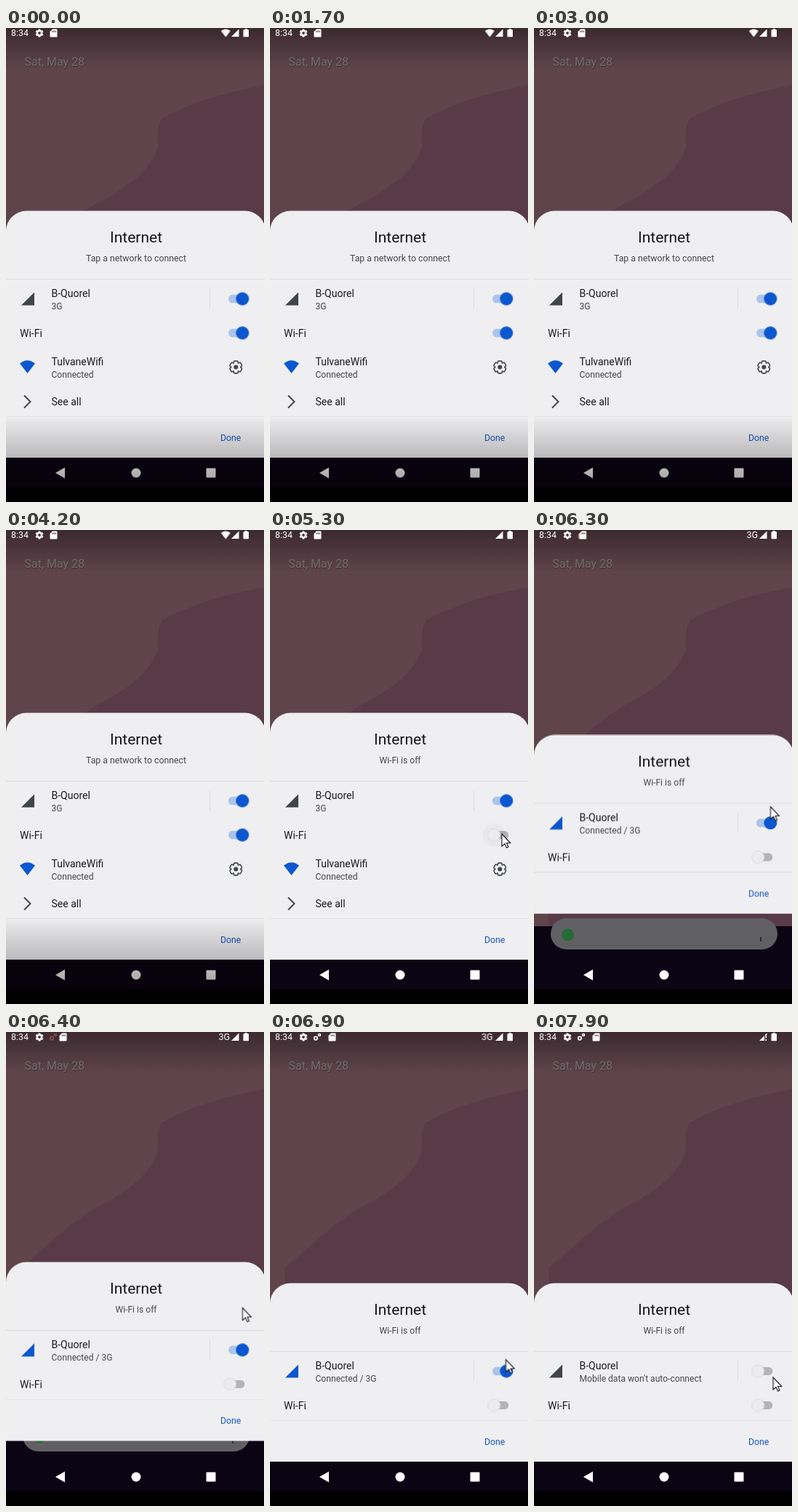
These frames come from a looping animation (355 by 652 pixels, 8000 ms). An HTML page:

```html
<!DOCTYPE html>
<html lang="en">
<head>
<meta charset="utf-8">
<title>Internet panel</title>
<style>
html, body { margin: 0; width: 100%; height: 100%; overflow: hidden; background: #000; }
svg { display: block; width: 355px; height: 652px; font-family: Roboto, sans-serif; }
.big { font-size: 21px; }
.row { font-size: 14px; fill: #1b1b1f; }
.sub { font-size: 12.1px; fill: #44464d; }
.mid { text-anchor: middle; }
.line { stroke: #dcdde1; }
.off { fill: #ececed; stroke: #d4d4d6; stroke-width: .7; }

/* hard switches */
.k { animation: var(--k) 8s step-end infinite; }
/* eased parts */
.m { animation: var(--k) 8s linear infinite; }

@keyframes wifiLost  { 0% { opacity: 1 } 66.2%, to { opacity: 0 } }
@keyframes wifiOff   { 0% { opacity: 0 } 66.2%, to { opacity: 1 } }
@keyframes listGone  { 0% { opacity: 1 } 78.6%, to { opacity: 0 } }
@keyframes dataUp    { 0% { opacity: 0 } 78.6%, to { opacity: 1 } }
@keyframes dataLive  { 0% { opacity: 0 } 78.6% { opacity: 1 } 93.6%, to { opacity: 0 } }
@keyframes dataDown  { 0% { opacity: 0 } 93.6%, to { opacity: 1 } }
@keyframes bars      { 0% { fill: #41454c } 78.6% { fill: #0b57d0 } 93.6%, to { fill: #41454c } }
@keyframes footer    { 0% { transform: none } 78.6%, to { transform: translateY(-94px) } }

@keyframes shade     { 0%, 61.25% { opacity: 1 } 66%, to { opacity: 0 } }
@keyframes slide {
  0%, 78.5% { transform: none }
  78.6% { transform: translateY(26px) }
  80% { transform: translateY(64.5px); animation-timing-function: ease-out }
  82%, to { transform: translateY(94px) }
}
@keyframes wifiThumb { 0%, 62.5% { transform: none } 65.5%, to { transform: translateX(-17px) } }
@keyframes wifiFade  { 0%, 62.5% { opacity: 1 } 65.5%, to { opacity: 0 } }
@keyframes dataThumb { 0%, 91.2% { transform: none } 93.7%, to { transform: translateX(-17px) } }
@keyframes dataFade  { 0%, 91.2% { opacity: 1 } 93.7%, to { opacity: 0 } }
@keyframes wifiHalo  { 0%, 62.2% { opacity: 0 } 63.5%, 78.5% { opacity: 1 } 78.6%, to { opacity: 0 } }
@keyframes dataHalo  { 0%, 91% { opacity: 0 } 92%, 95% { opacity: 1 } 98%, to { opacity: 0 } }
@keyframes card {
  0%, 78.6% { transform: none }
  80% { transform: translateX(13px) }
  82%, to { transform: translateX(20px) }
}
@keyframes gears     { 0%, 80% { color: #8a4a4c } 83%, to { color: #fff } }
@keyframes label     { 0%, 80% { transform: translateX(1.5px) } 82%, to { transform: none } }
@keyframes pointer {
  0%, 54.9% { transform: translate(331px, 574px); opacity: 0 }
  55% { transform: translate(331px, 574px); opacity: 1; animation-timing-function: ease-out }
  61.5%, 73% { transform: translate(319px, 418px) }
  77.5% { transform: translate(325.5px, 387px) }
  79%, 81.5% { transform: translate(325.5px, 379.5px) }
  86.25% { transform: translate(324.5px, 450.5px) }
  88.5%, 93.5% { transform: translate(322px, 461px) }
  98%, to { transform: translate(329px, 475px); opacity: 1 }
}
</style>
</head>
<body>
<svg viewBox="0 0 355 652">
  <defs>
    <linearGradient id="top" x2="0" y2="1">
      <stop stop-color="#1c1418" stop-opacity=".55"/>
      <stop offset="1" stop-color="#1c1418" stop-opacity="0"/>
    </linearGradient>
    <linearGradient id="low" x2="0" y2="1">
      <stop stop-opacity="0"/>
      <stop offset="1" stop-opacity=".45"/>
    </linearGradient>
    <rect id="teeth" x="-2.2" y="-7.6" width="4.4" height="15.2" rx=".6"/>
    <g id="gear">
      <circle r="5.7"/>
      <use href="#teeth"/>
      <use href="#teeth" transform="rotate(60)"/>
      <use href="#teeth" transform="rotate(120)"/>
    </g>
    <path id="fan" d="M-10.500-4.500Q0-13 10.500-4.500L0 9z"/>
    <rect id="track" x="306" y="-5.5" width="22" height="11" rx="5.5"/>
  </defs>

  <!-- wallpaper -->
  <rect width="355" height="652" fill="#60444c"/>
  <path d="M355 79Q270 94 215 124Q207 134 210 160Q206 180 183 203Q160 224 125 241Q90 262 62 289L20 325V600H355z" fill="#583b46"/>
  <rect width="355" height="58" fill="url(#top)"/>
  <rect y="545" width="355" height="87" fill="#0b0413"/>
  <rect y="632" width="355" height="20"/>
  <text x="26" y="52.5" font-size="16" fill="#3c2d32">Sat, May 28</text>
  <text x="25.5" y="52" font-size="16" fill="#716c6d">Sat, May 28</text>

  <!-- search bar -->
  <rect x="23" y="534" width="312" height="43" rx="21.5" fill="#606064"/>
  <circle cx="46.5" cy="557" r="8.5" fill="#256b36"/>
  <path d="M312 560v6" stroke="#2c2c30" stroke-width="2"/>

  <!-- status bar -->
  <g fill="#fff" color="#fff">
    <text x="7" y="11.3" font-size="12.4">8:34</text>
    <use href="#gear" transform="translate(46 7) scale(.72)"/>
    <circle cx="46" cy="7" r="1.9" fill="#4a393f"/>
    <g class="k" style="--k:dataUp">
      <g class="m" style="--k:gears" fill="none" stroke="currentColor">
        <circle cx="63" cy="8.6" r="2.2" stroke-width="1.8"/>
        <circle cx="68" cy="4" r="1.5" stroke-width="1.5"/>
      </g>
    </g>
    <g class="m" style="--k:card">
      <path d="M64 1.5h5.5q1 0 1 1v9q0 1-1 1h-8q-1 0-1-1V5z"/>
      <path d="M64.2 3.5v2.5M66.2 3.5v2.5M68.2 3.5v2.5" stroke="#4a393f"/>
    </g>
    <use class="k" style="--k:wifiLost" href="#fan" transform="translate(302.300 6.800) scale(.62)"/>
    <g class="k" style="--k:dataLive">
      <text class="m" style="--k:label" x="291" y="11.3" font-size="12.6">3G</text>
    </g>
    <path d="M310 12h10.5V1.5z"/>
    <g class="k" style="--k:dataDown">
      <path d="M317 4h4v8.5h-4z" fill="#45353b"/>
      <path d="M319.2 3v5.5M319.2 10v2" stroke="#fff" stroke-width="1.5"/>
    </g>
    <path d="M328.7 2.2V1h3v1.2h1.6q.7 0 .7.7v8.6q0 .7-.7.7h-6.1q-.7 0-.7-.7V2.9q0-.7.7-.7z"/>
  </g>

  <!-- sheet -->
  <g class="m" style="--k:slide">
    <path d="M0 497.500V279.500A28 28 0 0 1 28 251.500H329A28 28 0 0 1 357 279.500V497.500z" fill="#efeff1"/>
    <text class="big mid" x="179" y="295" fill="#151518">Internet</text>
    <g class="sub mid">
      <text class="k" style="--k:wifiLost" x="179" y="321" font-size="12.3">Tap a network to connect</text>
      <text class="k" style="--k:wifiOff" x="179" y="321">Wi-Fi is off</text>
    </g>
    <path class="line" d="M0 345.500H355M280.500 358V386"/>

    <path class="k" style="--k:bars" d="M21 381.500H39V363.500z"/>
    <text class="row" x="62.5" y="370">B-Quorel</text>
    <g class="sub">
      <text class="k" style="--k:listGone" x="62.5" y="387">3G</text>
      <text class="k" style="--k:dataLive" x="62.5" y="387">Connected / 3G</text>
      <text class="k" style="--k:dataDown" x="62.5" y="387">Mobile data won't auto-connect</text>
    </g>
    <g transform="translate(0.300 372.500)">
      <use href="#track" fill="#b4b4b6"/>
      <use class="m" style="--k:dataFade" href="#track" fill="#aac5ee"/>
      <circle class="m" style="--k:dataHalo" cx="308" r="16" fill="#000" fill-opacity=".025"/>
      <g class="m" style="--k:dataThumb">
        <circle class="off" cx="325" r="8.500"/>
        <circle class="m" style="--k:dataFade" cx="325" r="9" fill="#0b57d0"/>
      </g>
    </g>

    <text class="row" x="19" y="425">Wi-Fi</text>
    <g transform="translate(0.300 419.500)">
      <use href="#track" fill="#b4b4b6"/>
      <use class="m" style="--k:wifiFade" href="#track" fill="#aac5ee"/>
      <circle class="m" style="--k:wifiHalo" cx="308" r="16" fill="#000" fill-opacity=".025"/>
      <g class="m" style="--k:wifiThumb">
        <circle class="off" cx="325" r="8.500"/>
        <circle class="m" style="--k:wifiFade" cx="325" r="9" fill="#0b57d0"/>
      </g>
    </g>

    <g class="k" style="--k:listGone">
      <rect y="496.500" width="355" height="94.500" fill="#efeff1"/>
      <use href="#fan" x="29.500" y="466" fill="#0b57d0"/>
      <text class="row" x="62.5" y="464">TulvaneWifi</text>
      <text class="sub" x="62.5" y="481">Connected</text>
      <g transform="translate(316.300 466.500)">
        <use href="#gear" fill="#41454c" stroke="#41454c" stroke-width="3.2" stroke-linejoin="round"/>
        <use href="#gear" fill="#efeff1"/>
        <circle r="3" fill="#41454c"/>
      </g>
      <path d="M25 505.500l8.500 8.500l-8.500 8.500" fill="none" stroke="#41454c" stroke-width="2"/>
      <text class="row" x="62.5" y="519">See all</text>
    </g>

    <g class="k" style="--k:footer">
      <path class="line" d="M0 534.500H355" stroke-opacity=".7"/>
      <text x="295" y="568" font-size="12.3" fill="#1a56c0">Done</text>
    </g>
  </g>

  <!-- navigation -->
  <rect y="591" width="355" height="41" fill="#0b0413"/>
  <g fill="#fff">
    <path d="M68 612L81 604.500V619.500z"/>
    <circle cx="179" cy="612" r="6.500"/>
    <rect x="275.500" y="605.500" width="13" height="13" rx="1"/>
  </g>

  <rect class="m" style="--k:shade" y="532" width="355" height="120" fill="url(#low)"/>

  <path class="m" style="--k:pointer" d="M0 0V17L4 13.500L6.500 19L9 18L6.600 12.500H11.800z" fill="#fff" stroke="#1a1a1a" stroke-width="1.1"/>
</svg>
</body>
</html>
```
